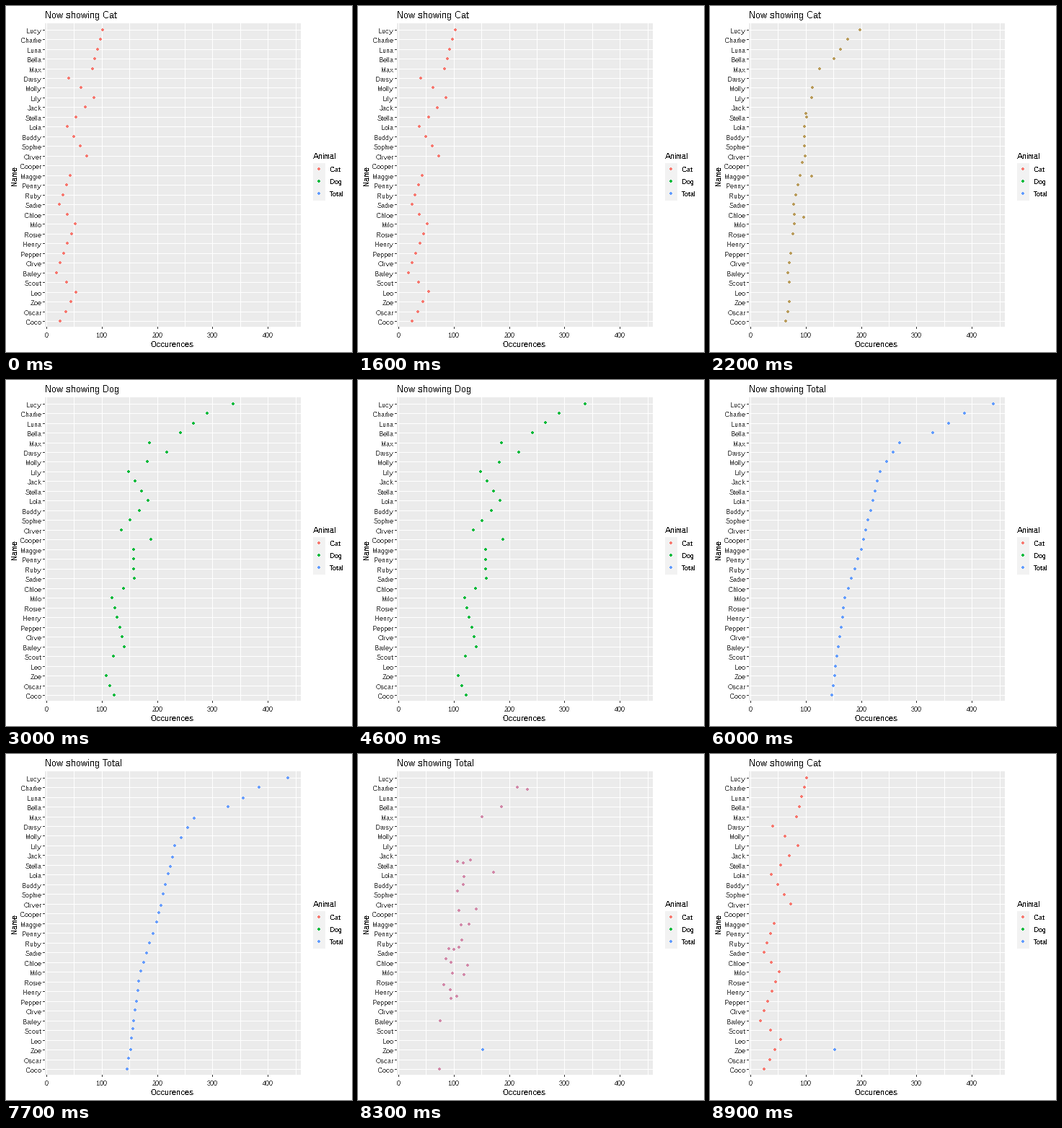
These frames come from a looping animation (480x480 px, 10000 ms). A matplotlib script:

```python
import matplotlib.pyplot as plt
import numpy as np
from matplotlib.animation import FuncAnimation
from matplotlib.collections import PolyCollection
from matplotlib.colors import to_rgb
from matplotlib.patches import Rectangle

plt.rcParams.update({"font.family": "Liberation Sans",
                     "text.hinting": "default", "text.hinting_factor": 1,
                     "text.antialiased": False})

SIZE, FRAMES, INTERVAL = 480, 100, 100
HOLD, MOVE = 15, 15
CYCLE = HOLD + MOVE

NAMES = ("Lucy Charlie Luna Bella Max Daisy Molly Lily Jack Stella Lola Buddy "
         "Sophie Oliver Cooper Maggie Penny Ruby Sadie Chloe Milo Rosie Henry "
         "Pepper Olive Bailey Scout Leo Zoe Oscar Coco").split()
RANK = np.arange(len(NAMES))

# Counts follow lines through a few key ranks; dogs make up the remainder
TOTAL = np.interp(RANK, [0, 1, 3, 4, 7, 15, 20, 30],
                  [439, 387, 330, 269, 234, 200, 171, 147])
CAT = np.interp(RANK, [0, 4, 5, 7, 10, 13, 14, 15, 18, 20, 25, 27, 30],
                [102, 83, 40, 86, 38, 73, 15, 43, 24, 52, 18, 54, 25])
DOG = TOTAL - CAT

ANIMALS = ["Cat", "Dog", "Total"]
COLORS = ["#F8766D", "#00BA38", "#619CFF"]
HIDDEN = {"Cat": "Cooper", "Dog": "Leo"}
TITLE_STARTS = [(84, "Cat"), (53, "Total"), (23, "Dog"), (0, "Cat")]

LEFT, RIGHT, TOP, BOTTOM = 54, 409, 24, 445


def x_at(value):
    return 56.5 + 0.768 * value


def y_at(row):
    return 33.05 + 13.49 * row


# Colours blend in CIE Lab
RGB_TO_XYZ = np.array([[0.4124, 0.3576, 0.1805],
                       [0.2126, 0.7152, 0.0722],
                       [0.0193, 0.1192, 0.9505]])
WHITE = RGB_TO_XYZ.sum(axis=1)


def rgb_to_lab(color):
    c = np.array(to_rgb(color))
    linear = np.where(c > 0.04045, ((c + 0.055) / 1.055) ** 2.4, c / 12.92)
    r = RGB_TO_XYZ @ linear / WHITE
    x, y, z = np.where(r > 0.008856, np.cbrt(r), 7.787 * r + 16 / 116)
    return np.array([116 * y - 16, 500 * (x - y), 200 * (y - z)])


def lab_to_rgb(lab):
    y = (lab[0] + 16) / 116
    r = np.array([y + lab[1] / 500, y, y - lab[2] / 200])
    xyz = np.where(r > 0.2069, r ** 3, (r - 16 / 116) / 7.787) * WHITE
    c = np.clip(np.linalg.solve(RGB_TO_XYZ, xyz), 0, 1)
    return np.clip(np.where(c > 0.0031308,
                            1.055 * c ** (1 / 2.4) - 0.055, 12.92 * c), 0, 1)


def ease(t):
    return 4 * t ** 3 if t < 0.5 else 1 - 4 * (1 - t) ** 3


# Each state lists its points alphabetically; points pair up by list position
def state_points(animal, values):
    shown = sorted(n for n in NAMES if n != HIDDEN.get(animal))
    rows = [NAMES.index(n) for n in shown]
    return np.array([(x_at(values[r]), y_at(r)) for r in rows])


STATES = [state_points(a, v) for a, v in zip(ANIMALS, (CAT, DOG, TOTAL))]
LABS = [rgb_to_lab(c) for c in COLORS]
LEFTOVER = STATES[2][-1:]

# A 4 px disc without its corner pixels, turned through four quarters
QUARTER = np.array([(-1, -2), (1, -2), (1, -1)])
TURN = np.array([[0, 1], [-1, 0]])
DOT = np.vstack([QUARTER @ np.linalg.matrix_power(TURN, q) for q in range(4)])


def dot_shapes(points):
    return [DOT + np.floor(p) for p in points]


fig = plt.figure(figsize=(SIZE / 100, SIZE / 100), dpi=100, facecolor="white")
ax = fig.add_axes([0, 0, 1, 1])
ax.set(xlim=(0, SIZE), ylim=(SIZE, 0))
ax.axis("off")


def box(x, y, w, h, color):
    ax.add_patch(Rectangle((x, y), w, h, fc=color, lw=0, aa=False, snap=False))


def label(x, y, text, px, color="black", **kw):
    kw = {"ha": "left", "va": "baseline", **kw}
    return ax.text(x, y, text, fontsize=px * 0.72, color=color, **kw)


def dots(points, colors):
    shapes = PolyCollection(dot_shapes(points), facecolors=colors, linewidths=0,
                            antialiaseds=False, snap=False, zorder=3)
    return ax.add_collection(shapes, autolim=False)


box(LEFT, TOP, RIGHT - LEFT, BOTTOM - TOP, "#EBEBEB")
for value in range(0, 451, 50):
    x = int(x_at(value))
    box(x, TOP, 1, BOTTOM - TOP, "white")
    if value % 100 == 0:
        box(x, BOTTOM, 1, 3, "#333333")
        label(x, 460, str(value), 9, "#4D4D4D", ha="center")
for row, name in enumerate(NAMES):
    y = int(y_at(row))
    box(LEFT, y, RIGHT - LEFT, 1, "white")
    box(LEFT - 3, y, 3, 1, "#333333")
    label(49.5, y + 5, name, 9, "#4D4D4D", ha="right")

label(231, 473, "Occurences", 11, ha="center")
label(17, 235.5, "Name", 11, rotation=90, ha="right", va="center")
title = label(54, 17, "", 13)

label(426, 212, "Animal", 11)
box(426, 218, 17, 52, "#F2F2F2")
keys = [226 + 17 * i for i in range(3)]
for y, animal in zip(keys, ANIMALS):
    label(449, y + 4, animal, 9)
dots([(434, y) for y in keys], COLORS)
moving = dots(STATES[0], [COLORS[0]])
leftover = dots(LEFTOVER, [COLORS[2]])


def update(frame):
    title.set_text("Now showing " + next(a for s, a in TITLE_STARTS if frame >= s))
    step = min(frame, 3 * CYCLE - 1) - HOLD
    k = max(step // CYCLE, 0)
    after = (k + 1) % 3
    p = ease(min(max((step - k * CYCLE) / MOVE, 0), 1))
    n = min(len(STATES[k]), len(STATES[after]))
    moving.set_verts(dot_shapes(STATES[k][:n] * (1 - p) + STATES[after][:n] * p))
    moving.set_facecolor([lab_to_rgb(LABS[k] * (1 - p) + LABS[after] * p)])
    # The unpaired last point appears with Total and stays until the loop ends
    leftover.set_visible(frame >= 2 * CYCLE)
    return title, moving, leftover


anim = FuncAnimation(fig, update, frames=FRAMES, interval=INTERVAL,
                     repeat=True, repeat_delay=0)
plt.show()
```
